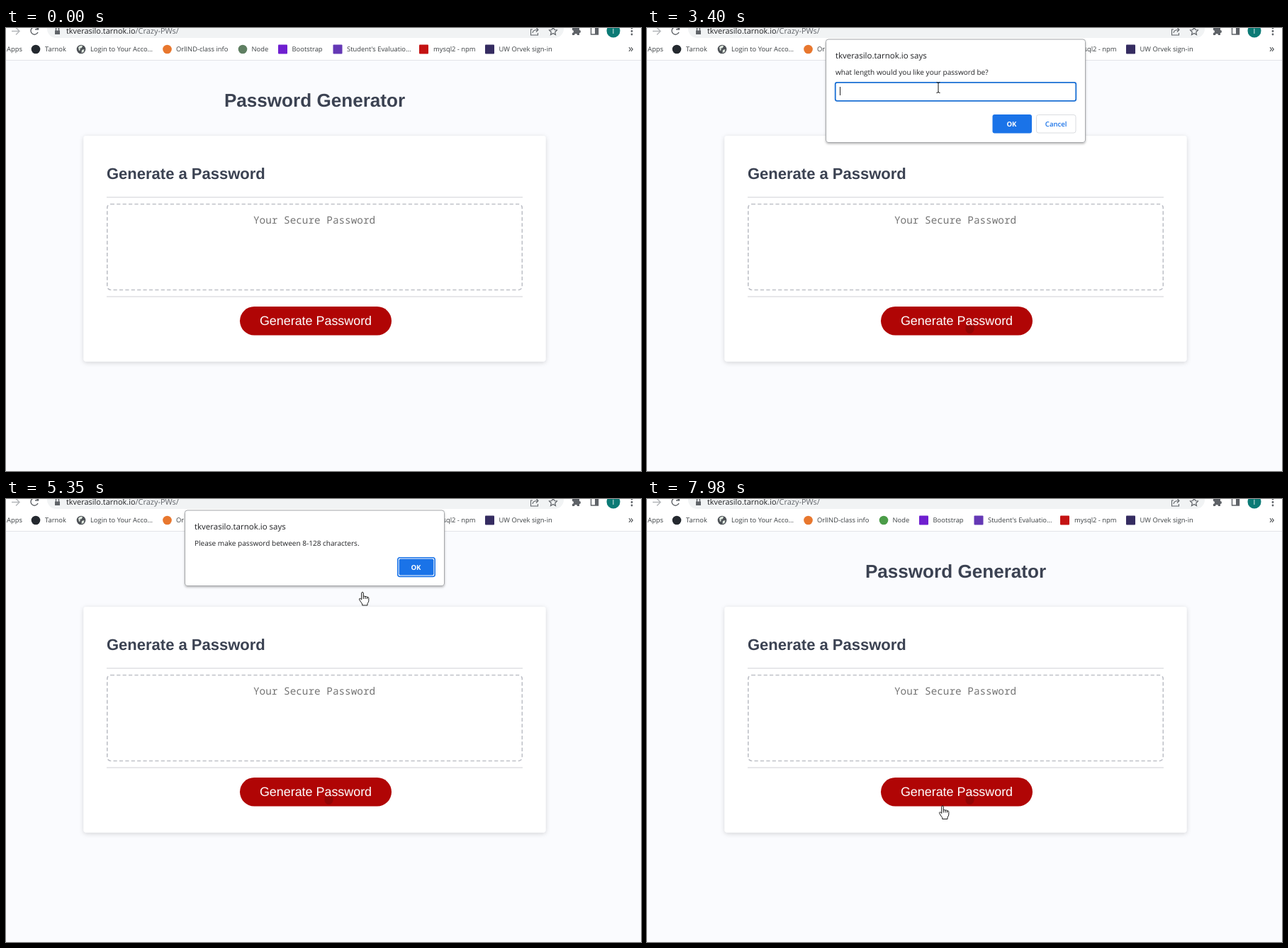
An HTML page that plays this animation: 896 by 625 pixels, repeating every 8000 ms.

```html
<!DOCTYPE html>
<html lang="en">
<head>
<meta charset="utf-8">
<title>Password Generator</title>
<style>
  html, body { margin: 0; width: 100%; height: 100%; overflow: hidden; background: #fafbfe; }
  svg { display: block; width: 896px; height: 625px; }
  text { white-space: pre; text-rendering: geometricPrecision; }
  .ui { font-family: "Open Sans", "Noto Sans", sans-serif; fill: #202124; }
  .mark { font-size: 9.4px; fill: #3c4043; }
  .title { font-size: 11.5px; }
  .body { font-size: 10.05px; }
  .btn { font-size: 9.6px; font-weight: 600; text-anchor: middle; }
  .page { font-family: "Liberation Sans", Arial, sans-serif; }
  .head { font-weight: 700; fill: #3b4252; }
  .line { fill: none; stroke: #5f6368; stroke-width: 1.4; }
</style>
</head>
<body>
<svg viewBox="0 0 896 625">
  <defs>
    <filter id="cardShadow" x="-5%" y="-5%" width="110%" height="112%">
      <feDropShadow dx="0" dy="1.6" stdDeviation="3" flood-opacity=".16"/>
    </filter>
    <filter id="boxShadow" x="-5%" y="-10%" width="110%" height="125%">
      <feDropShadow dx="0" dy="1.5" stdDeviation="1.6" flood-opacity=".28"/>
    </filter>
  </defs>

  <rect width="896" height="625" fill="#fafbfe"/>

  <!-- browser bar -->
  <rect width="896" height="45" fill="#fff"/>
  <path d="M0 45.5H896" stroke="#e2e4e8"/>
  <rect x="58" y="-12" width="729" height="26" rx="13" fill="#f1f3f4"/>
  <path class="line" d="M8 4.5H19M14 -.5L19 4.5L14 9.5" style="stroke:#b4b7ba"/>
  <path class="line" d="M44.5 1A5.2 5.2 0 1 0 45 6M45.5 -2V2H41"/>
  <path d="M69 3.5H76V9H69Z" fill="#5f6368"/>
  <path class="line" d="M70.5 4V1a2 2 0 0 1 4 0V4"/>
  <text class="ui" x="85" y="8" font-size="10.95">tkverasilo.tarnok.io<tspan fill="#5f6368">/Crazy-PWs/</tspan></text>
  <path class="line" d="M743 2H740.5V10H750.5V7M743 7Q743.5 2.5 750 2.5M748 -.5L751 2.5L748 5.5" style="stroke-width:1.1"/>
  <path class="line" d="M772 -1.5L773.7 2.5L777.5 3L774.7 5.8L775.5 9.5L772 7.5L768.5 9.5L769.3 5.8L766.5 3L770.3 2.5Z" style="stroke-width:1.2"/>
  <path d="M799 -1H803A2 2 0 0 1 807 -1H809V3A2 2 0 0 1 809 7V10H806A1.8 1.8 0 0 0 802 10H799V7A2 2 0 0 0 799 3Z" fill="#5f6368"/>
  <path class="line" d="M825.5 -2H835.5V9H825.5Z"/>
  <path d="M831 -2H836V9H831Z" fill="#5f6368"/>
  <circle cx="857" cy="4" r="9.5" fill="#0b7a75"/>
  <text class="ui" x="857" y="8" font-size="10" text-anchor="middle" style="fill:#fff">I</text>
  <g fill="#5f6368"><circle cx="883" cy="0" r="1.4"/><circle cx="883" cy="4.5" r="1.4"/><circle cx="883" cy="9" r="1.4"/></g>
  <g id="bookmarks"></g>

  <!-- page -->
  <g class="page">
    <text class="head" x="435.5" y="111" font-size="26.1" text-anchor="middle">Password Generator</text>
    <rect x="109.5" y="152" width="652" height="318.5" rx="4" fill="#fff" filter="url(#cardShadow)"/>
    <text class="head" x="142" y="213" font-size="22">Generate a Password</text>
    <path d="M142 238.7H729M142 379H729" stroke="#dfe0e3" stroke-width="1.4"/>
    <rect x="142.8" y="248.5" width="585.5" height="121" rx="5" fill="none" stroke="#bfc1c8" stroke-width="1.63" stroke-dasharray="5.2 3.2"/>
    <text x="349" y="276" font-size="14.35" fill="#757575" style="font-family:'Noto Sans Mono','DejaVu Sans Mono',monospace">Your Secure Password</text>
    <rect x="330" y="393" width="214" height="40.5" rx="20.25" fill="#b00505"/>
    <text x="437" y="419" font-size="17.9" fill="#fff" text-anchor="middle">Generate Password</text>
    <path id="smudge" d="M449.5 420H461.5V426Q459.5 431 455.5 431Q451 431 449.5 426Z" fill="#8a0606" opacity=".75"/>
  </g>

  <!-- dialogs -->
  <g id="prompt">
    <rect x="252.5" y="16" width="366" height="145.5" rx="3.5" fill="#fff" stroke="#a6a8ab" filter="url(#boxShadow)"/>
    <text class="ui title" x="266" y="43">tkverasilo.tarnok.io says</text>
    <text class="ui body" x="266" y="66">what length would you like your password be?</text>
    <rect id="field" x="265.7" y="76.8" width="339.6" height="26" rx="2.5" fill="#fff"/>
    <text id="typed" class="ui body" x="272" y="93">4</text>
    <path id="caret" d="M0 83V95" stroke="#202124"/>
    <rect id="promptOk" x="487.5" y="122" width="55.5" height="26.5" rx="3"/>
    <text class="ui btn" x="514.5" y="138.500" style="fill:#fff;font-weight:700">OK</text>
    <rect x="549.5" y="122.5" width="55.5" height="25.5" rx="3" fill="#fff" stroke="#dadce0"/>
    <text class="ui btn" x="577.2" y="138.5" style="fill:#1a73e8">Cancel</text>
  </g>
  <g id="alert">
    <rect x="252.5" y="16" width="366" height="106.5" rx="3.5" fill="#fff" stroke="#a6a8ab" filter="url(#boxShadow)"/>
    <text class="ui title" x="266" y="43">tkverasilo.tarnok.io says</text>
    <text class="ui body" x="266" y="66">Please make password between 8-128 characters.</text>
    <rect x="552.8" y="82.8" width="52.4" height="26.6" rx="3" fill="#fff" stroke="#1a73e8" stroke-width="1.6"/>
    <rect id="alertOk" x="554.6" y="84.6" width="48.8" height="23" rx="2"/>
    <text class="ui btn" x="578.5" y="99.5" style="fill:#fff;font-weight:700">OK</text>
  </g>

  <!-- pointer, drawn around its hot spot -->
  <g id="pointer">
    <circle id="click" r="10" fill="#fff500" opacity=".55"/>
    <path id="arrow" d="M.3 .3V13.2L3.2 10.6L5.2 15.3L7.4 14.3L5.5 9.8H9.5Z" fill="#fff" stroke="#111" stroke-width=".9"/>
    <g id="hand" fill="#fff" stroke="#111" stroke-width=".95" stroke-linejoin="round">
      <path d="M-1.3 10.5V1.2Q-1.3 0 0 0T1.3 1.2V6Q2.6 5 4 6.2Q5.5 5.5 6.5 6.8Q8.8 6.5 8.8 8.5V12Q8.8 14 7 16V18.5H-.3V16.5Q-2 14.5 -4.2 10.8Q-5 9 -3.8 8.7Q-2.6 8.7 -1.3 10.5Z"/>
      <path d="M1.3 6V9.5M4 6.2V9.5M6.5 6.8V9.5" fill="none"/>
    </g>
    <path id="beam" d="M-2.5 -7.5Q0 -7.5 0 -6V6Q0 7.5 -2.5 7.5M2.5 -7.5Q0 -7.5 0 -6M0 6Q0 7.5 2.5 7.5" fill="none" stroke="#111"/>
  </g>
</svg>
<script>
const LOOP = 8000, STEP = 67;
const el = id => document.getElementById(id);
const show = (id, on) => el(id).setAttribute('visibility', on ? 'inherit' : 'hidden');
const set = (id, attrs) => {
  for (const name in attrs) el(id).setAttribute(name, attrs[name]);
};

// label, x, icon shape, icon centre, colour, id
const bookmarks = [
  ['Apps', 1],
  ['Tarnok', 55, 'dot', 42, '#24292f'],
  ['Login to Your Acco...', 119, 'globe', 106, '#4d5156'],
  ['OrlIND-class info', 240, 'dot', 227.5, '#e8772e'],
  ['Node', 346.5, 'dot', 334, '#5f7f62', 'node'],
  ['Bootstrap', 403.5, 'square', 390.5, '#6f1fd0'],
  ["Student's Evaluatio...", 481, 'square', 468, '#6438b5'],
  ['mysql2 - npm', 603, 'square', 589.5, '#c41212'],
  ['UW Orvek sign-in', 695.5, 'square', 682.5, '#352c61']
];
const icons = {
  dot: (x, fill, id) => `<circle id="${id}" cx="${x}" cy="30" r="6.3" fill="${fill}"/>`,
  square: (x, fill) => `<rect x="${x - 6.5}" y="23.5" width="13" height="13" rx="1" fill="${fill}"/>`,
  globe: (x, fill, id) => icons.dot(x, fill, id) +
    `<path d="M${x - 4} 27q3 -3 6 -2l-1 3l-3 1l1 2l-2 1zM${x + 1} 31l3.5 -1l-1 4l-3 1z" fill="#dfe8df"/>`
};
el('bookmarks').innerHTML = bookmarks.map(([label, x, icon, cx, fill, id = 'mark' + x]) =>
  (icon ? icons[icon](cx, fill, id) : '') + `<text class="ui mark" x="${x}" y="33">${label}</text>`
).join('') + '<text class="ui mark" x="878" y="34" style="font-size:15px">»</text>';

// pointer stops: time, x, y, shape
const stops = [
  [390, 701, 545, 'arrow'], [460, 521, 444, 'arrow'],
  [790, 480, 425, 'hand'], [860, 452.5, 411.5, 'hand'],
  [1730, 443, 395, 'hand'], [1800, 437, 318, 'arrow'], [1860, 430, 228, 'arrow'], [1930, 423, 156, 'arrow'],
  [2260, 417, 112, 'arrow'], [2330, 411, 84, 'beam'],
  [4330, 420, 89, 'beam'], [4400, 445, 101, 'beam'], [4460, 470, 113, 'arrow'], [4530, 486, 120, 'arrow'],
  [4600, 493, 124, 'arrow'], [4670, 499, 128, 'hand'], [4740, 503, 131.5, 'hand'],
  [6140, 508, 129, 'arrow'], [6210, 520, 124, 'arrow'], [6280, 536, 118, 'arrow'], [6350, 550, 112, 'arrow'],
  [6420, 560, 107, 'arrow'], [6490, 566, 104, 'arrow'], [6560, 568, 103, 'arrow'],
  [7560, 566, 108, 'arrow'], [7630, 552, 145, 'arrow'], [7700, 528, 210, 'arrow'], [7770, 495, 290, 'arrow'],
  [7840, 455, 365, 'arrow'], [7910, 430, 410, 'hand'], [7980, 417, 433, 'hand']
];
const shapes = ['arrow', 'hand', 'beam'];
const clicks = [1060, 5010, 6830];

// window fades: opacity and vertical offset per step
const opening = [[0, -11], [.2, -11], [.8, -3], [1, 0]];
const closing = [[1, 0], [1, -2], [.94, -6], [.4, -9], [0, -10]];

function drawDialog(id, t, openAt, closeAt) {
  const [phase, start] = t < closeAt ? [opening, openAt] : [closing, closeAt];
  const step = Math.max(0, Math.min(phase.length - 1, Math.floor((t - start) / STEP)));
  const [opacity, dy] = phase[step];
  const scale = 1 - dy * .001;
  set(id, { opacity, transform: `translate(${435 * (1 - scale)} ${dy}) scale(${scale} 1)` });
  show(id, opacity > 0);
}

function drawPrompt(t) {
  drawDialog('prompt', t, 1260, 5075);
  const typed = t >= 3740, focused = t < 5080;
  const blinkStart = typed ? 3740 : 1270;
  show('typed', typed);
  show('caret', focused && Math.floor((t - blinkStart) / 530 + .02) % 2 === 0);
  set('caret', { transform: `translate(${typed ? 278.5 : 272.5} 0)` });
  set('field', { stroke: focused ? '#1a6fd4' : '#dadce0', 'stroke-width': focused ? 1.8 : 1 });
  set('promptOk', { fill: t >= 4530 ? '#2779e8' : '#1a73e8' });
}

function drawPointer(t) {
  const stop = stops.filter(s => s[0] <= t).pop();
  show('pointer', stop);
  const [, x, y, shape] = stop || stops[0];
  set('pointer', { transform: `translate(${x} ${y})` });
  for (const id of shapes) show(id, stop && id === shape);
  show('click', clicks.some(c => t >= c && t < c + 195));
}

function draw(t) {
  drawPrompt(t);
  drawDialog('alert', t, 5140, 6890);
  set('alertOk', { fill: t >= 6350 ? '#2b7de9' : '#1a73e8' });
  set('node', { fill: t < 7030 ? '#5f7f62' : '#4b9c48' });
  show('smudge', t >= 1730);
  drawPointer(t);
}

function frame() {
  draw(performance.now() % LOOP);
  requestAnimationFrame(frame);
}
frame();
</script>
</body>
</html>
```
